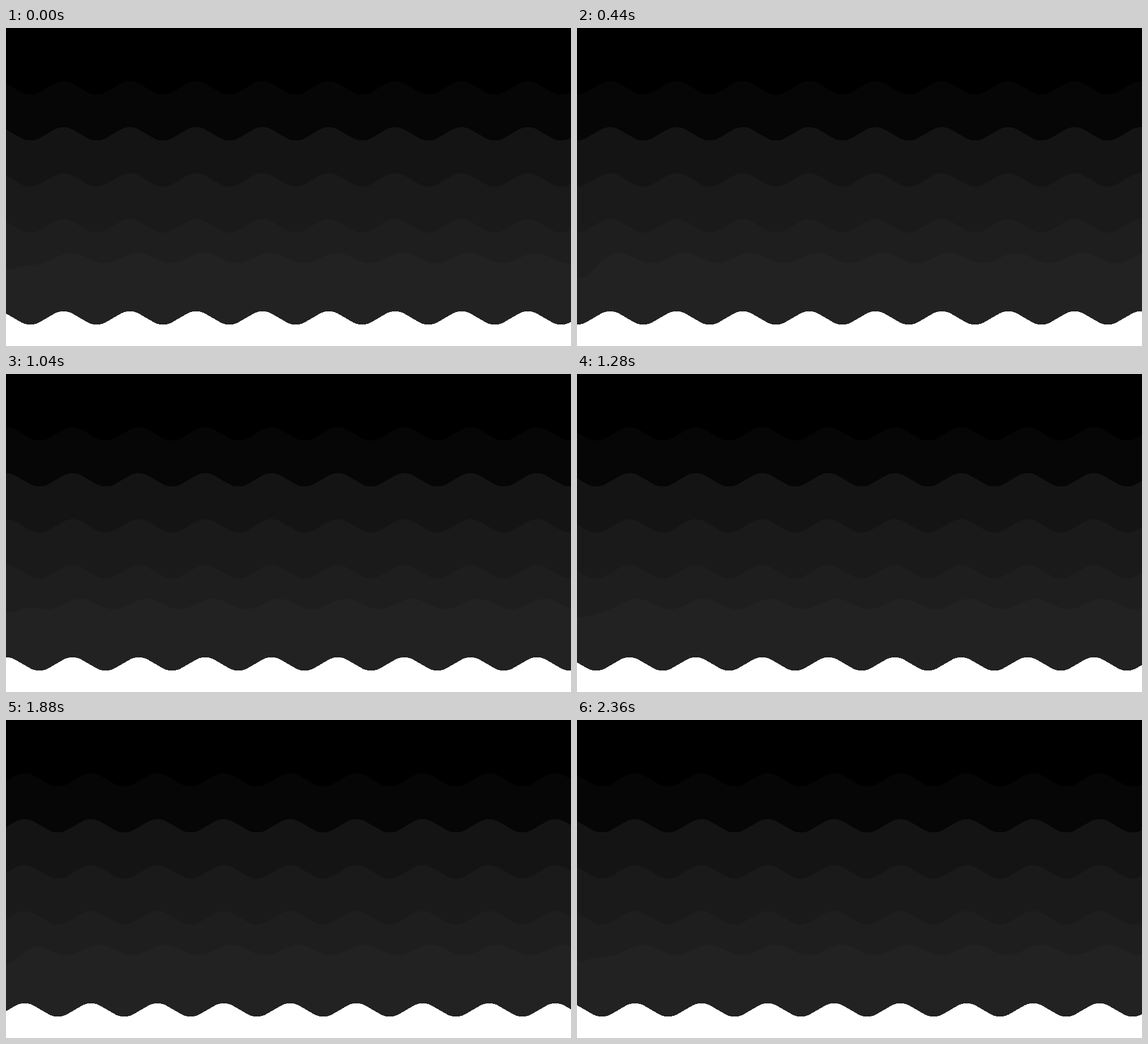
Animation of 998 by 561 pixels, one loop 2.4 s. Source, as an HTML page with a canvas:

```html
<!DOCTYPE html>
<html lang="en">
<head>
<meta charset="utf-8">
<title>Waves</title>
<style>
  html, body { margin: 0; width: 100%; height: 100%; overflow: hidden; background: #000; }
  canvas { display: block; }
</style>
</head>
<body>
<canvas id="stage" width="998" height="561"></canvas>
<script>
const ctx = document.getElementById('stage').getContext('2d');
const W = 998, H = 561;
const LOOP = 2400, STEP = 40;
const PERIOD = 117.2, RADIUS = 33.4, HEIGHT = 23.5;
const SLOPE = Math.tan(Math.PI / 6);

// [ms, x of a crest]
const DRIFT = [
  [0, 101.5], [440, 58.5], [760, 27.5], [1040, 0.2],
  [1480, -45.2], [1880, -84.2], [2360, -131.9]
];

function crestAt(t) {
  let i = 1;
  while (i < DRIFT.length - 1 && t > DRIFT[i][0]) i++;
  const [t0, x0] = DRIFT[i - 1], [t1, x1] = DRIFT[i];
  return x0 + (x1 - x0) * (t - t0) / (t1 - t0);
}

// Depth below the crest: round crest, 30 degree flank, round trough.
function depth(d) {
  d = Math.abs(d - PERIOD * Math.round(d / PERIOD));
  const half = PERIOD / 2;
  if (d > half / 2) return HEIGHT - depth(half - d);
  const arc = x => RADIUS - Math.sqrt(RADIUS * RADIUS - x * x);
  const end = RADIUS / 2;
  return d < end ? arc(d) : arc(end) + (d - end) * SLOPE;
}

const wave = top => (x, crest) => top + depth(x - crest);

// Softened wave that sinks towards the left edge.
function softWave(x, crest) {
  const soft = 406 - 9 * Math.cos(2 * Math.PI * (x - crest - 13.8) / PERIOD);
  const sink = 29 * Math.exp(-((x / 34) ** 2));
  return Math.min(soft + sink, 418.5 + depth(x - crest));
}

const LAYERS = [
  ['#060606', wave(94)],
  ['#141414', wave(175)],
  ['#1a1a1a', wave(256.3)],
  ['#1e1e1e', wave(337.3)],
  ['#222222', softWave],
  ['#ffffff', wave(499.8)]
];

function draw(t) {
  const crest = crestAt(t);
  ctx.fillStyle = '#000';
  ctx.fillRect(0, 0, W, H);
  for (const [color, edge] of LAYERS) {
    ctx.fillStyle = color;
    for (let x = 0; x < W; x++) {
      const y = Math.round(edge(x + 0.5, crest));
      ctx.fillRect(x, y, 1, H - y);
    }
  }
}

const start = performance.now();
let shown = -1;

function tick() {
  const t = Math.floor((performance.now() - start) % LOOP / STEP) * STEP;
  if (t !== shown) draw(shown = t);
  requestAnimationFrame(tick);
}
tick();
</script>
</body>
</html>
```
